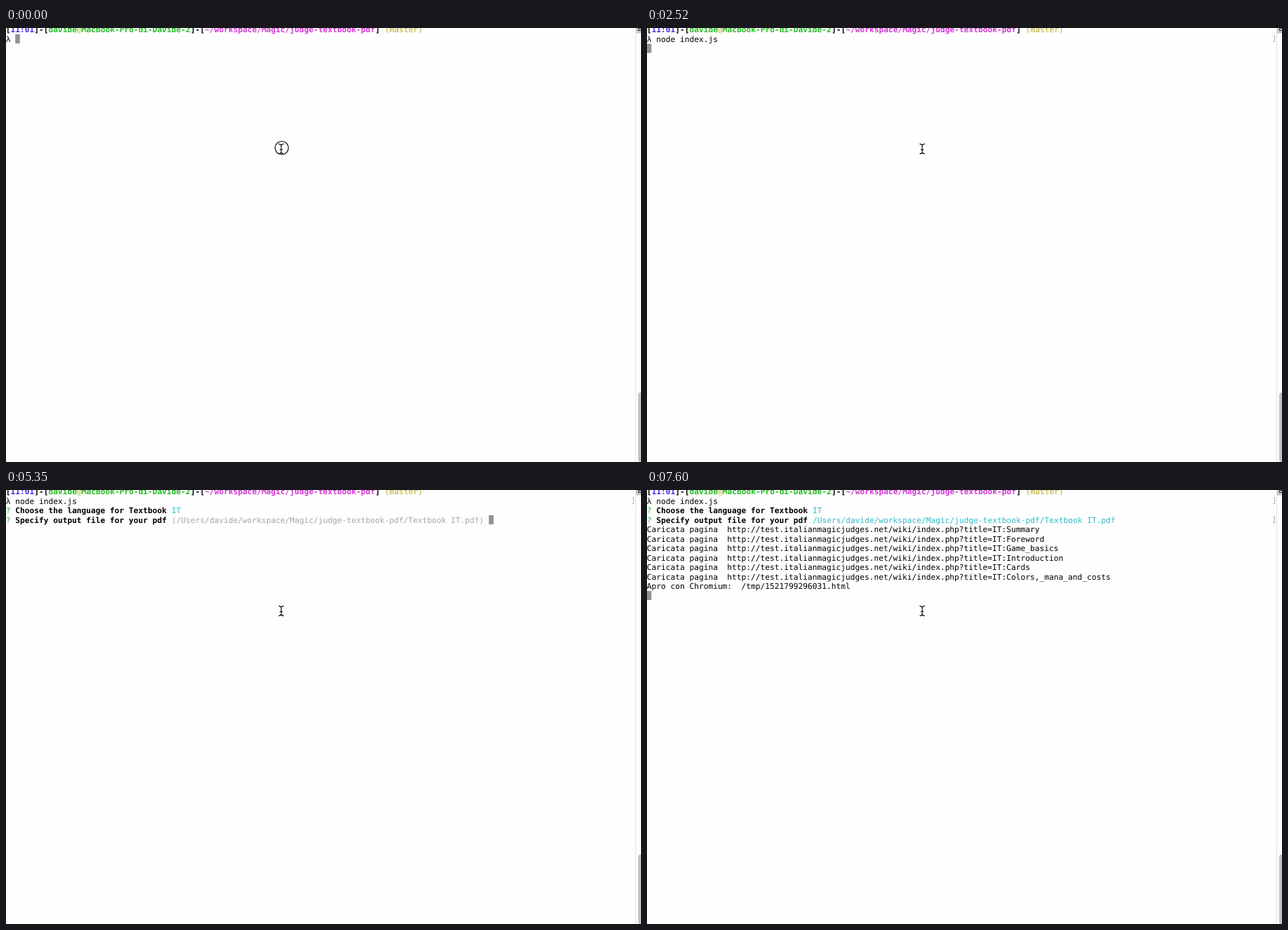
These frames come from a looping animation (905 px wide and 619 px high, 8000 ms). An HTML page:

```html
<!DOCTYPE html>
<html lang="en">
<head>
<meta charset="utf-8">
<title>Terminal session</title>
<style>
  html, body { margin: 0; width: 100%; height: 100%; overflow: hidden; background: #fefefe; }
  svg { display: block; }
  text {
    font: 11.21px "DejaVu Sans Mono", monospace;
    white-space: pre;
    text-rendering: geometricPrecision;
  }
  text.bold, text.blue, text.host, text.path { font-weight: bold; }
  .blue { fill: #492ee1; }
  .host, .green { fill: #25bc24; }
  .path { fill: #d338d3; }
  .olive { fill: #b5ad27; }
  .cyan { fill: #33bbc8; }
  .grey { fill: #a6a6a6; }
  .block { fill: #929292; }
  .tint { fill: #f5f5f5; }
  .mark { fill: none; stroke: #b0b0b0; }
</style>
</head>
<body>
<svg width="905" height="619" viewBox="0 0 905 619">
  <g id="terminal"></g>
  <path d="M897.5 0V619" stroke="#e3e3e3"/>
  <path d="M898 0h7v7.5h-7z" fill="#c4c4c4"/>
  <path d="M901.5 0V4M901 .5h4M901 3.5h4" stroke="#333" fill="none"/>
  <path d="M905 520h-1a3 3 0 0 0-3 3v93a3 3 0 0 0 3 3h1z" fill="#c1c1c1"/>
  <circle id="ring" cx="393" cy="171" r="9.5" fill="none" stroke="#111" stroke-width="1.2"/>
  <path d="M388.5 165.3q3 0 3.7 2.2q.7-2.2 3.7-2.2M388.5 179.5q3 0 3.7-2.2q.7 2.2 3.7 2.2M392.2 167v11M390 173.5h4.4"
        fill="none" stroke="#111" stroke-width="1.2"/>
</svg>
<script>
const LOOP = 8000, COL = 6.75, ROW = 13.5, LEFT = -0.3;
const terminal = document.getElementById("terminal");
const ring = document.getElementById("ring");

const command = "node index.js ";
const file = "/Users/davide/workspace/Magic/judge-textbook-pdf/Textbook IT.pdf";
const wiki = "http://test.italianmagicjudges.net/wiki/index.php?title=IT:";
const pages = ["Summary", "Foreword", "Game_basics", "Introduction", "Cards", "Colors,_mana_and_costs"];
const languages = ["IT", "EN", "FR", "PT", "RU"];

// [start time, value] steps
const typed = [[0, 0], [890, 2], [1190, 4], [1340, 6], [1480, 7], [1630, 9], [1780, 14]];
const chosen = [[0, 0], [4020, 1], [4170, 2], [4460, 1], [4610, 0]];
const loaded = [[0, 0], [6850, 5], [7000, 6]];
const at = (steps, t) => steps.filter(s => s[0] <= t).pop()[1];

const rowTop = row => row * ROW - 4.5;

// A row is a list of [text, class] pieces laid out on the character grid.
function line(pieces, row) {
  let col = 0;
  return pieces.map(([text, cls = ""]) => {
    const x = LEFT + col * COL;
    col += text.length;
    return `<text x="${x}" y="${rowTop(row) + 10.7}" class="${cls}">${text}</text>`;
  }).join("");
}

const block = (col, row) =>
  `<rect class="block" x="${LEFT + col * COL}" y="${rowTop(row)}" width="6.6" height="13"/>`;
const tint = (row, count) =>
  `<rect class="tint" x="0" y="${rowTop(row)}" width="10" height="${count * ROW - 1}"/>`;
const mark = row => `<path class="mark" d="M892 ${rowTop(row) + 2}h2.5v8.5h-2.5"/>`;
const question = text => [["? ", "green"], [text + " ", "bold"]];

function draw(t) {
  const count = at(typed, t);
  const rows = [
    [["[", "bold"], ["11:01", "blue"], ["]-[", "bold"], ["davide", "host"], ["@", "olive"],
     ["MacBook-Pro-di-Davide-2", "host"], ["]-[", "bold"],
     ["~/workspace/Magic/judge-textbook-pdf", "path"], ["] ", "bold"], ["(master)", "olive"]],
    [["λ " + command.slice(0, count)]]
  ];
  let under = "", cursor = "";

  if (t >= 1780) under += mark(1);
  if (t < 2520) cursor = block(2 + count, 1);
  else if (t < 3420) cursor = block(0, 2);
  else {
    const ask = question("Choose the language for Textbook");
    rows.push(ask);
    if (t < 5350) {
      if (t < 4020) ask.push(["(Use arrow keys)", "grey"]);
      const pick = at(chosen, t);
      languages.forEach((name, i) =>
        rows.push(i === pick ? [["❯", "cyan"], [" " + name, "cyan"]] : [["  " + name]]));
      under += tint(4, 4);
    } else {
      ask.push(["IT", "cyan"]);
      const output = question("Specify output file for your pdf");
      rows.push(output);
      if (t < 6250) {
        output.push([`(${file})`, "grey"]);
        cursor = block(102, 3);
      } else {
        output.push([file, "cyan"]);
        under += mark(3);
        pages.slice(0, at(loaded, t)).forEach(p => rows.push([["Caricata pagina  " + wiki + p]]));
        if (t >= 7300) rows.push([["Apro con Chromium:  /tmp/1521799296031.html"]]);
        else if (t < 7000) under += tint(rows.length, 1);
        cursor = block(0, rows.length);
      }
    }
  }
  return under + cursor + rows.map(line).join("");
}

let shown = "";
const start = performance.now();
function frame() {
  const t = (performance.now() - start) % LOOP;
  const next = draw(t);
  if (next !== shown) terminal.innerHTML = shown = next;
  ring.style.display = t < 150 ? "" : "none";
  requestAnimationFrame(frame);
}
frame();
</script>
</body>
</html>
```
